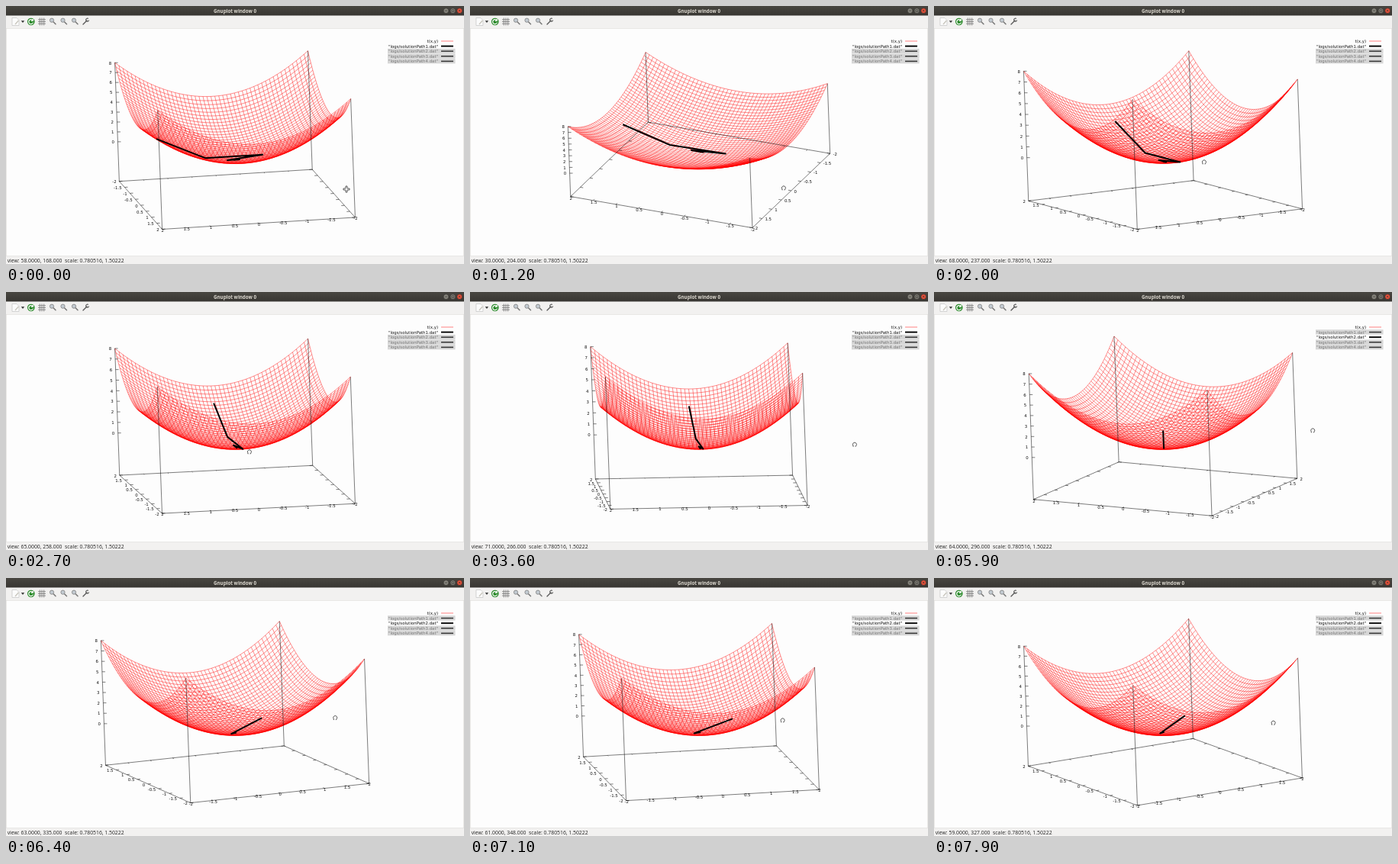
An HTML page that plays this animation: 600 px wide and 338 px high, repeating every 8000 ms.

```html
<!DOCTYPE html>
<html lang="en">
<head>
<meta charset="utf-8">
<title>Gnuplot window 0</title>
<style>
html, body { margin: 0; width: 100%; height: 100%; overflow: hidden; background: #fff; }
svg { display: block; width: 600px; height: 338px; }
text { white-space: pre; }
.ui { font-family: "Open Sans", "Noto Sans", sans-serif; }
.plot { font: 5.4px "DejaVu Sans", sans-serif; fill: #111; }
</style>
</head>
<body>
<svg viewBox="0 0 600 338" xmlns="http://www.w3.org/2000/svg">
  <defs>
    <linearGradient id="bar" x2="0" y2="1">
      <stop offset="0" stop-color="#484641"/><stop offset="1" stop-color="#383632"/>
    </linearGradient>
    <g id="lens" fill="none">
      <path d="M1 1L4 4" stroke="#777" stroke-width="1.5" stroke-linecap="round"/>
      <circle cx="-1" cy="-1" r="2.6" fill="#c3cbd2" stroke="#888" stroke-width=".9"/>
    </g>
  </defs>
  <rect width="600" height="338" fill="#f2f1f0"/>
  <rect x=".3" y="29.3" width="599.4" height="298.4" fill="#fdfdfd" stroke="#dedcd9" stroke-width=".6"/>
  <path id="mesh" fill="none" stroke="#f00" stroke-width=".45"/>
  <path id="frame" fill="none" stroke="#111" stroke-width=".55"/>
  <path id="track" fill="none" stroke="#000" stroke-width="2" stroke-linejoin="round"/>
  <g id="labels" class="plot"></g>
  <g id="legend" class="plot" text-anchor="end"></g>
  <path id="cursor" stroke="#333" stroke-width=".8"/>

  <rect width="600" height="12.5" fill="url(#bar)"/>
  <text class="ui" x="300" y="8.6" font-size="6.2" font-weight="700" fill="#dfdbd2" text-anchor="middle">Gnuplot window 0</text>
  <g stroke="#2e2c29" stroke-width=".6">
    <circle cx="576.5" cy="6.2" r="3.4" fill="#85837b"/>
    <circle cx="585.4" cy="6.2" r="3.4" fill="#85837b"/>
    <circle cx="594.2" cy="6.2" r="3.4" fill="#e9523c"/>
    <path d="M575 6.2h3M584 4.900h2.800v2.600H584zM593 5l2.400 2.400m0-2.400L593 7.400" fill="none"/>
  </g>

  <path d="M8 15.500h6l3 3v7H8z" fill="#fbfbfb" stroke="#c4c4c4" stroke-width=".7"/>
  <path d="M12 24l4.500-5" stroke="#c8c5bc" stroke-width="1.300"/>
  <path d="M19.800 19.300h4.400L22 21.900z" fill="#333"/>
  <circle cx="32.800" cy="20.500" r="4.800" fill="#2b8a2b"/>
  <path d="M35.300 19a3 3 0 1 0 .3 2.600m-.3-4.600v2.400h-2.400" fill="none" stroke="#fff" stroke-width="1.200"/>
  <path d="M44.300 15.500v10M47 15.500v10M49.700 15.500v10M42 17.800h10M42 20.500h10M42 23.200h10" stroke="#777" stroke-width=".8"/>
  <use href="#lens" x="61" y="19.700"/><use href="#lens" x="75.500" y="19.700"/><use href="#lens" x="90" y="19.700"/>
  <path d="M101 24l5-5" stroke="#555" stroke-width="1.300" stroke-linecap="round"/>
  <path d="M107.800 16.500a2 2 0 1 0 .8 2.200" fill="none" stroke="#555" stroke-width="1.100"/>
  <text id="status" class="ui" x="1.700" y="335.600" font-size="6.850" fill="#222"></text>
</svg>
<script>
const $ = id => document.getElementById(id);
const set = (id, name, value) => $(id).setAttribute(name, value);
const LOOP = 8000, STEP = 100, SAMPLES = 50;
const HAND = "M-1.300 2.200H-2.200V1A2.500 2.500 0 1 1 1.900 1.200L1.500 2.200H.5";
const CROSS = "M-1-4h2v3h3v2h-3v3h-2v-3h-3v-2h3z";

// Where the pointer takes hold, and the views [time, x angle, z angle] it turns through.
const gestures = [
  { x: 446, y: 240, views: [[0, 58, 168]] },
  { x: 471, y: 192, views: [[300, 58, 168], [1200, 30, 204]] },
  { x: 409, y: 268, views: [[1300, 30, 204], [2000, 68, 237], [2400, 57, 246], [2900, 71, 266]] },
  { x: 504, y: 200, views: [[3600, 71, 266], [4200, 65, 280]] },
  { x: 538, y: 54, views: [[4700, 65, 280], [5200, 65, 280]], still: true },
  { x: 523, y: 180, views: [[5700, 65, 280], [6400, 63, 335], [7000, 61, 350], [7500, 60, 341], [7900, 59, 327]] }
];
// Descent steps along a line through the minimum.
const tracks = [
  { slope: .045, xs: [1.64, .635, -.565, .175, -.08, .04] },
  { slope: .49, xs: [.77, -.13, .02] }
];

const mix = (a, b, p) => a + (b - a) * p;
const smooth = p => p * p * (3 - 2 * p);
const height = (x, y) => x * x + y * y;
const f = n => n.toFixed(2);
const line = pts => "M" + pts.map(p => f(p[0]) + " " + f(p[1])).join("L");

function viewAt(views, t) {
  const i = views.findIndex(v => v[0] > t);
  if (i < 0) return views.at(-1).slice(1);
  const a = views[Math.max(0, i - 1)], b = views[i];
  const p = Math.max(0, (t - a[0]) / (b[0] - a[0] || 1));
  return [1, 2].map(n => Math.round(mix(a[n], b[n], p)));
}

// A full window width turns 360 degrees, a full height 180.
function pointer(g, [rx, rz]) {
  const [, rx0, rz0] = g.views[0];
  return [g.x - (rz - rz0) / .6, g.y - (rx - rx0) / .6];
}

function stateAt(t) {
  const i = gestures.findLastIndex(g => g.views[0][0] <= t);
  const g = gestures[i], next = gestures[i + 1];
  const end = g.views.at(-1)[0], view = viewAt(g.views, t);
  let pos = pointer(g, view);
  if (t > end && next) {
    const p = smooth((t - end) / (next.views[0][0] - end));
    pos = [mix(pos[0], next.x, p), mix(pos[1], next.y, p)];
  }
  return { view, pos, drag: i > 0 && !g.still && (t <= end) };
}

// Rotate about z, then x, with a slight roll of the screen plane.
function camera([rx, rz]) {
  const r = Math.PI / 180, c = Math.cos(rz * r), s = Math.sin(rz * r);
  const cx = Math.cos(rx * r), sx = Math.sin(rx * r), roll = .0175;
  return (x, y, z) => {
    const X = (x * c + y * s) / 2;
    const Y = (y * c - x * s) / 2 * cx + 1.50222 * (z - 2) / 6 * sx;
    return [300 + 129.5 * (X - roll * Y), 175.6 - 61 * (Y + roll * X)];
  };
}

function label(p, text, anchor, dx, dy) {
  return `<text x="${f(p[0] + dx)}" y="${f(p[1] + dy + 1.95)}" text-anchor="${anchor}">${text}</text>`;
}

const tick = (p, q) => line([p, [mix(p[0], q[0], .016), mix(p[1], q[1], .016)]]);

function drawMesh(at) {
  const v = Array.from({ length: SAMPLES }, (_, i) => -2 + 4 * i / (SAMPLES - 1));
  const point = (x, y) => at(x, y, height(x, y));
  set("mesh", "d", v.map(a => line(v.map(b => point(a, b))) + line(v.map(b => point(b, a)))).join(""));
}

function drawAxes(at) {
  const corners = [[-2, -2], [2, -2], [2, 2], [-2, 2]];
  const floor = corners.map(([x, y]) => at(x, y, -4));
  let d = line(floor) + "Z", out = "";
  corners.forEach(([x, y], i) => d += line([floor[i], at(x, y, 8)]));

  const low = floor.reduce((m, p, i) => p[1] > floor[m][1] ? i : m, 0);
  const [fx, fy] = corners[low], front = floor[low];
  const endX = at(-fx, fy, -4), endY = at(fx, -fy, -4);
  const xWide = Math.abs(endX[0] - front[0]) > Math.abs(endY[0] - front[0]);

  const axis = (edge, end, wide) => {
    const slope = (end[1] - front[1]) / (end[0] - front[0]);
    const side = end[0] < front[0] ? -1 : 1;
    for (let v = -2; v <= 2; v += .5) {
      const p = edge(v, 1), q = edge(v, -1);
      d += tick(p, q) + tick(q, p);
      out += wide
        ? label(p, v, "middle", .6, 1.2 + 7 * Math.max(0, slope))
        : label(p, v, side < 0 ? "end" : "start", side * 3.8, .7);
    }
  };
  axis((v, k) => at(v, fy * k, -4), endX, xWide);
  axis((v, k) => at(fx * k, v, -4), endY, !xWide);

  const left = floor.reduce((m, p, i) => p[0] < floor[m][0] ? i : m, 0);
  for (let z = 0; z <= 8; z++) {
    const p = at(...corners[left], z);
    d += line([p, [p[0] + 4, p[1]]]);
    out += label(p, z, "end", -4.5, .3);
  }
  set("frame", "d", d);
  $("labels").innerHTML = out;
}

function drawTrack(at, track) {
  const pts = track ? track.xs.map(x => at(x, x * track.slope, height(x, x * track.slope))) : [];
  set("track", "d", pts.length ? line(pts) : "");
}

function drawLegend(shown) {
  let out = '<text x="566" y="47.9">t(x,y)</text><path d="M570 46h16" stroke="#f00" stroke-width=".5"/>';
  for (let i = 1; i <= 4; i++) {
    const y = 46 + 6.6 * i, on = i === shown;
    if (!on) out += `<rect x="500" y="${f(y - 3.3)}" width="88.5" height="6.3" fill="#d6d6d6"/>`;
    out += `<text x="566" y="${f(y + 1.9)}" fill="${on ? "#111" : "#777"}">"logs/solutionPath${i}.dat"</text>` +
      `<path d="M570 ${f(y)}h16" stroke="${on ? "#000" : "#333"}" stroke-width="${on ? 1.9 : 1.5}"/>`;
  }
  $("legend").innerHTML = out;
}

function render(t) {
  const { view, pos, drag } = stateAt(t);
  const shown = t < 4900 ? 1 : t < 5200 ? 0 : 2;
  const at = camera(view);
  drawMesh(at);
  drawAxes(at);
  drawTrack(at, tracks[shown - 1]);
  drawLegend(shown);
  $("status").textContent = `view: ${view[0].toFixed(4)}, ${view[1].toFixed(3)}  scale: 0.780516, 1.50222`;
  set("cursor", "d", drag ? HAND : CROSS);
  set("cursor", "fill", drag ? "none" : "#fff");
  set("cursor", "transform", `translate(${pos.map(f)})`);
}

const start = performance.now();
let last = -1;
function loop() {
  const step = Math.floor((performance.now() - start) % LOOP / STEP);
  if (step !== last) render((last = step) * STEP);
  requestAnimationFrame(loop);
}
loop();
</script>
</body>
</html>
```
